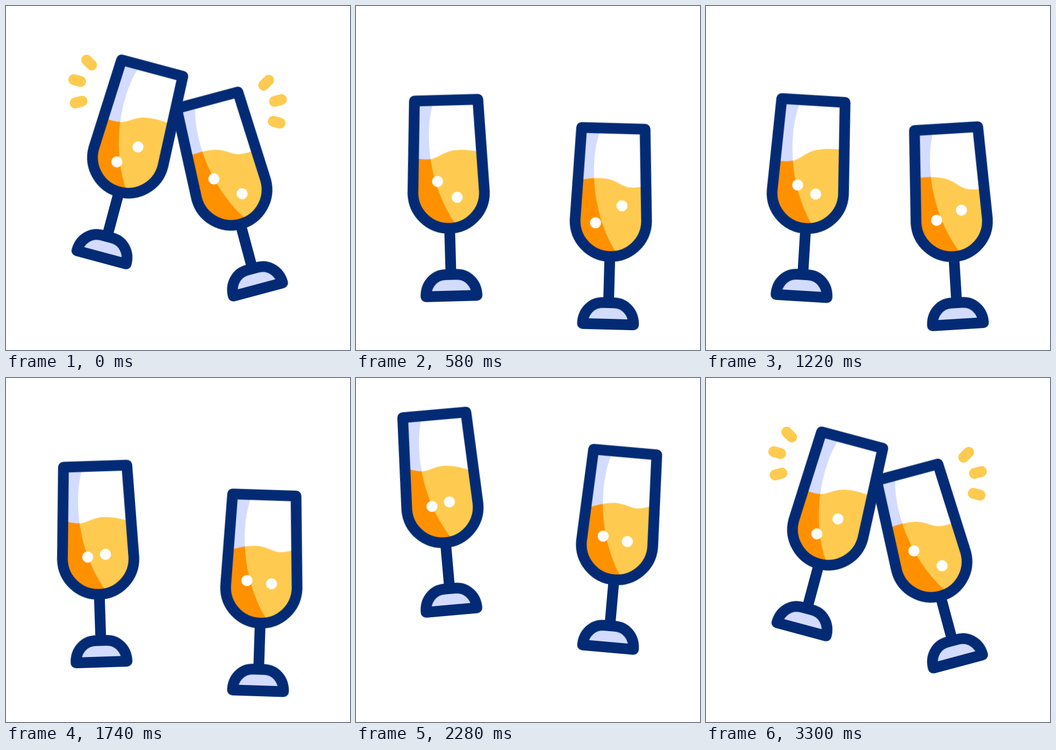
Write an HTML page that moves like this. It is 640 px wide and 640 px high and loops after 3.6 s.

```html
<!DOCTYPE html>
<html lang="en">
<head>
<meta charset="utf-8">
<title>Cheers</title>
<style>
  html, body { margin: 0; width: 100%; height: 100%; overflow: hidden; background: #fff; }
  svg { display: block; width: 100%; height: 100%; }

  .left  { --s: 1; }
  .right { --s: -1; }
  .drop, .tilt, .wave, .bubble, .spark, .burst {
    animation: 3600ms cubic-bezier(.333, 0, .667, 1) infinite;
  }
  .left .drop  { animation-name: drop-left; }
  .right .drop { animation-name: drop-right; }
  .tilt   { animation-name: tilt; }
  .wave   { animation-name: slosh; }
  .bubble { animation-name: bob; fill: #fff; }
  .spark  { animation-name: spark; stroke: #fecb50; }
  .burst  { animation-name: burst; stroke: #ff6152; }

  .line { fill: none; stroke: #032b75; stroke-width: 20; stroke-linejoin: round; }
  .rays { fill: none; stroke-width: 20; stroke-linecap: round; }
  .rays path { stroke-dasharray: 1 6; }
  .light  { fill: #d3dcff; }
  .yellow { fill: #fecb50; }
  .orange { fill: #ff9100; }

  @keyframes drop-left {
    0%, 55.56%, 81.11%, 100% { transform: translateY(0); }
    12.36%, 45.97% { transform: translateY(72px); }
    63.89% { transform: translateY(-36.3px); }
  }
  @keyframes drop-right {
    0%, 55.56%, 56.94%, 83.61%, 100% { transform: translateY(0); }
    12.36%, 45.97% { transform: translateY(64.6px); }
    66.67% { transform: translateY(-36.3px); }
  }
  @keyframes tilt {
    0%, 81.11%, 100% { transform: rotate(calc(var(--s) * 15deg)); }
    12.36% { transform: rotate(calc(var(--s) * -10deg)); }
    19.44%, 36.11% { transform: rotate(calc(var(--s) * 5.3deg)); }
    27.78%, 45.97%, 63.89% { transform: rotate(calc(var(--s) * -5.3deg)); }
    55.56% { transform: rotate(calc(var(--s) * 16.8deg)); }
  }
  @keyframes slosh {
    0%, 88.89%, 100% { transform: rotate(-12deg); }
    12.36% { transform: rotate(10deg); }
    19.44%, 36.11% { transform: rotate(-19deg); }
    27.78%, 45.97% { transform: rotate(4deg); }
    55.56% { transform: rotate(-20deg); }
    66.67% { transform: rotate(12deg); }
  }
  @keyframes bob {
    0%, 24.72%, 55.56%, 91.67%, 100% { transform: translate(0, 0); }
    13.72%, 39.61%, 73.33% { transform: translate(var(--x), var(--y)); }
  }
  @keyframes spark {
    0% { stroke-dashoffset: 0; }
    5.56% { stroke-dashoffset: -1.2; }
    80% { stroke-dashoffset: -1.2; animation-timing-function: step-end; }
    80.01% { stroke-dashoffset: 1.2; }
    88%, 100% { stroke-dashoffset: 0; }
  }
  @keyframes burst {
    0%, 52.78% { stroke-dashoffset: 1.2; }
    54.7%, 55.7% { stroke-dashoffset: 0; }
    60.5%, 100% { stroke-dashoffset: -1.2; }
  }
</style>
</head>
<body>
<svg viewBox="0 0 640 640">
  <defs>
    <path id="bowl" d="M-59-364.5H59L66.5-192.5A66.5 66.5 0 0 1-66.5-192.5Z"/>
    <path id="shade" d="M-26-354C-40-308-40-214 10-136V-110H-90V-370H-31Z"/>
    <path id="liquid" d="M-150-27.5L-54 0C-47 2-40 3.5-33 3.5C-18 3.5-8-7 13-7C28-7 40-4 54 0L150 27.5V220H-150Z"/>
    <clipPath id="in-bowl"><use href="#bowl"/></clipPath>
    <clipPath id="in-shade"><use href="#shade"/></clipPath>
    <g id="frame" class="line">
      <use href="#bowl"/>
      <path d="M0-126V-40"/>
      <path class="light" d="M-47.5 0C-47.5-22-32-40-10-40H10C32-40 47.5-22 47.5 0Z"/>
    </g>
  </defs>

  <g class="left" transform="translate(177.7 467.6)">
    <g class="drop"><g class="tilt">
      <g clip-path="url(#in-bowl)">
        <use href="#bowl" fill="#fff"/>
        <use href="#shade" class="light"/>
        <g transform="translate(0 -262.5)"><use href="#liquid" class="wave yellow"/></g>
        <g clip-path="url(#in-shade)">
          <g transform="translate(0 -262.5)"><use href="#liquid" class="wave orange"/></g>
        </g>
      </g>
      <circle class="bubble" cx="-18.4" cy="-179" r="10.3" style="--x:-2px;--y:-39.8px"/>
      <circle class="bubble" cx="12.3" cy="-216" r="10.3" style="--x:3.7px;--y:37.2px"/>
      <use href="#frame"/>
    </g></g>
  </g>

  <g class="right" transform="translate(468.8 527.4)">
    <g class="drop"><g class="tilt">
      <g clip-path="url(#in-bowl)">
        <use href="#bowl" fill="#fff"/>
        <use href="#shade" class="light"/>
        <g transform="translate(0 -262.5) scale(-1 1)"><use href="#liquid" class="wave yellow"/></g>
        <g clip-path="url(#in-shade)">
          <g transform="translate(0 -262.5) scale(-1 1)"><use href="#liquid" class="wave orange"/></g>
        </g>
      </g>
      <circle class="bubble" cx="-26" cy="-220" r="10.3" style="--x:-2.7px;--y:36.5px"/>
      <circle class="bubble" cx="17.6" cy="-179.7" r="10.3" style="--x:2.6px;--y:-47px"/>
      <use href="#frame"/>
    </g></g>
  </g>

  <g class="rays">
    <path class="spark" pathLength="1" d="M159.5 110L150 100.5"/>
    <path class="spark" pathLength="1" d="M139 140.5L126 137"/>
    <path class="spark" pathLength="1" d="M141.5 177L128.5 180.5"/>
    <path class="spark" pathLength="1" d="M479.3 147.5L488.8 138"/>
    <path class="spark" pathLength="1" d="M499.5 177.5L512.5 174"/>
    <path class="spark" pathLength="1" d="M497 214.5L510 218"/>
    <path class="burst" pathLength="1" d="M299.5 183L280.5 164"/>
    <path class="burst" pathLength="1" d="M329.5 183L348 164"/>
    <path class="burst" pathLength="1" d="M299.5 213.5L280.5 232"/>
    <path class="burst" pathLength="1" d="M329.5 213.5L348 232"/>
  </g>
</svg>
</body>
</html>
```
